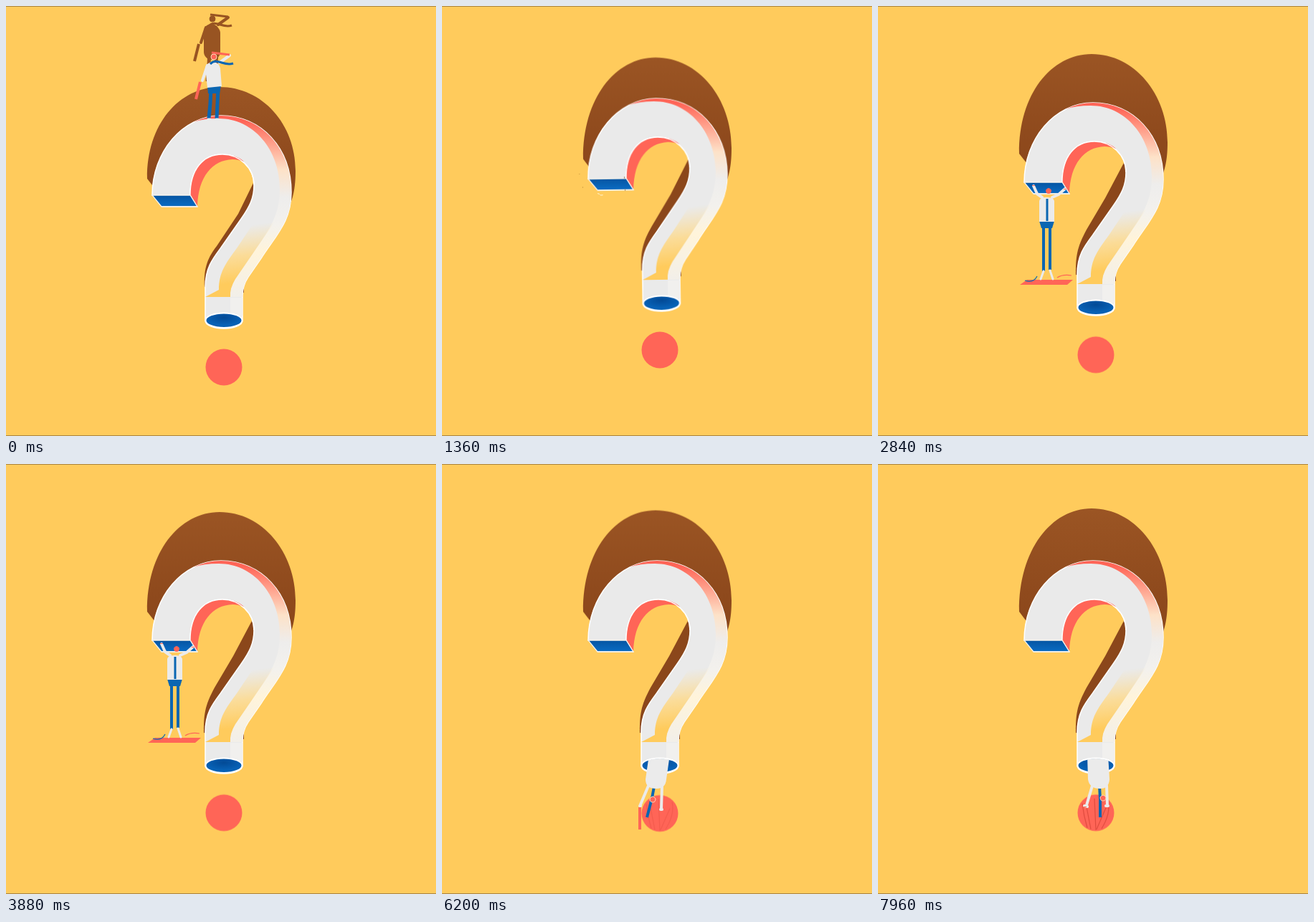
An HTML page without scripts for the animation above (8000 ms loop, 600x600 px).

```html
<!DOCTYPE html>
<html lang="en">
<head>
<meta charset="utf-8">
<title>Question mark acrobat</title>
<style>
html, body { margin: 0; width: 100%; height: 100%; overflow: hidden; background: #ffcb5c; }
svg { display: block; width: 100%; height: 100%; }

/* palette helpers */
.w { fill: #ebebeb; } .b { fill: #0a66b2; } .r { fill: #ff6557; }
.lw, .lb, .lr { fill: none; stroke-width: 4; stroke-linejoin: round; }
.lw { stroke: #ebebeb; stroke-linecap: round; }
.lb { stroke: #0a66b2; }
.lr { stroke: #ff6557; }
.thin { stroke-width: 3; }
.thick { stroke-width: 5; }
.hair { stroke-width: 1.2; }
.ring { stroke: #ffd9b8; stroke-width: 1; }

/* every moving part shares the same 8 s clock */
.mark, .shade, .strip, .dot, .showA, .showB, .showC, .showD, .jump, .cast, .poseA path,
.drop, .poseB path, .mat, .dust, .fall, .hang, .poseD path, .reach, .grip, .rim {
  animation: 8s linear infinite;
}
.mark { transform-origin: 302px 268px; animation-name: mark; animation-timing-function: ease-in-out; }
.shade { transform-origin: 300px 206px; animation-name: shade; animation-timing-function: ease-in-out; }
.strip { animation-name: strip; }
.dot { animation-name: dot; animation-timing-function: ease-in-out; }
.showA { animation-name: showA; animation-timing-function: step-end; }
.showB { animation-name: showB; animation-timing-function: step-end; }
.showC { animation-name: showC; animation-timing-function: step-end; }
.showD { animation-name: showD; animation-timing-function: step-end; }
.jump { animation-name: jump; }
.cast { animation-name: cast; }
.poseA path { animation-name: poseA; }
.drop { animation-name: drop; }
.poseB path { animation-name: poseB; animation-timing-function: ease-in-out; }
.mat { transform-origin: 235px 386px; animation-name: mat; }
.dust { transform-origin: 230px 250px; animation-name: dust; }
.fall { animation-name: fall; }
.hang { animation-name: hang; animation-timing-function: ease-out; }
.poseD path { animation-name: poseD; animation-timing-function: ease-in-out; }
.reach { transform-origin: 304px 452px; animation-name: reach; animation-timing-function: ease-in-out; }
.grip { animation-name: grip; }
.rim { animation-name: rim; }

@keyframes mark {
  0%, 3.5% { transform: none; }
  4.5% { transform: translateY(3px); }
  6%, 13% { transform: none; }
  14.3% { transform: translateY(18px) scale(1.01, .98); }
  17% { transform: translateY(-24px) rotate(-.8deg); }
  20% { transform: translateY(-15px) rotate(1.3deg) scale(1, 1.01); }
  23% { transform: translate(1px, -13px) rotate(1.3deg) scale(.985, 1.02); }
  27% { transform: translateY(-19px) rotate(-.3deg); }
  30%, 50.5% { transform: translateY(-18px); }
  52% { transform: translateY(-25px); }
  54% { transform: translateY(-16px); }
  56%, 100% { transform: translateY(-18px); }
}
@keyframes shade {
  0%, 13% { d: var(--p); transform: none; }
  14.3% { d: var(--p); transform: translateY(16px); }
  18% { d: var(--q); transform: none; }
  23% { d: var(--q); transform: translate(1px, 3px) scale(.985, .945); }
  30%, 48.5%, 50.5% { d: var(--q); transform: scale(1, .965); }
  52% { d: var(--q); transform: scale(1.02, 1.1); }
  54%, 60.5% { d: var(--q); transform: scale(1, .972); }
  77.5% { d: var(--q); transform: scale(1, .982); }
  100% { d: var(--q); transform: none; }
}
@keyframes strip { 0%, 14.3% { d: var(--p); } 18%, 100% { d: var(--q); } }
@keyframes dot {
  0%, 13% { transform: none; }
  14.3% { transform: translateY(23px); }
  17% { transform: translateY(-24px); }
  23% { transform: translate(-6px, -9.5px); }
  27% { transform: translate(1px, -19px); }
  30%, 50.5% { transform: translateY(-17.3px); }
  52% { transform: translateY(-13px); }
  54% { transform: translateY(-19px); }
  56%, 59% { transform: translateY(-17.3px); }
  60.5% { transform: translateY(-24px); }
  63.5%, 67.5% { transform: translateY(-17.3px); }
  70.5% { transform: translateY(9px); }
  73.5%, 77.5% { transform: translateY(-16.5px); }
  81% { transform: translateY(18px); }
  84%, 100% { transform: translateY(-17.3px); }
}
@keyframes showA { 0% { visibility: visible; } 13.5%, 100% { visibility: hidden; } }
@keyframes showB { 0% { visibility: hidden; } 17.5% { visibility: visible; } 52%, 100% { visibility: hidden; } }
@keyframes showC { 0% { visibility: hidden; } 57% { visibility: visible; } 63%, 100% { visibility: hidden; } }
@keyframes showD { 0% { visibility: hidden; } 65%, 100% { visibility: visible; } }
@keyframes jump {
  0%, 3.5% { transform: none; animation-timing-function: ease-out; }
  8% { transform: translate(32px, -90px); animation-timing-function: ease-in; }
  10.5% { transform: translate(49px, -26px); }
  13%, 100% { transform: translate(49px, 45px); }
}
@keyframes cast { 0%, 3.5% { transform: translate(-2px, -53px); } 10.5%, 100% { transform: translate(1px, -49px); } }
@keyframes poseA { 0%, 3.5% { d: var(--p); } 8%, 100% { d: var(--q); } }
@keyframes drop {
  0%, 17.5% { transform: translateY(-110px); animation-timing-function: ease-in; }
  21.5%, 49.5% { transform: none; animation-timing-function: ease-in; }
  52%, 100% { transform: translateY(-150px); }
}
@keyframes poseB { 0%, 24% { d: var(--p); } 31%, 100% { d: var(--q); } }
@keyframes mat {
  0%, 19.5% { transform: scaleX(0); }
  21.5%, 51.5% { transform: none; }
  54%, 100% { transform: scaleX(0); }
}
@keyframes dust {
  0%, 16.9% { opacity: 0; transform: scale(.5); }
  17% { opacity: 1; transform: scale(.5); }
  23% { opacity: .8; transform: none; }
  26%, 100% { opacity: 0; transform: scale(1.04); }
}
@keyframes fall {
  0%, 57% { transform: translateY(-75px); animation-timing-function: ease-in; }
  60.5% { transform: none; }
  63%, 100% { transform: translateY(75px); }
}
@keyframes hang { 0%, 65% { transform: translateY(-110px); } 68.5%, 100% { transform: none; } }
@keyframes poseD { 0%, 79% { d: var(--p); } 86%, 100% { d: var(--q); } }
@keyframes reach {
  0%, 67.5%, 73.5%, 77.5%, 84%, 100% { transform: none; }
  70.5% { transform: scaleY(1.45); }
  81% { transform: scaleY(1.55); }
}
@keyframes grip { 0%, 69% { opacity: 0; } 71%, 77.5% { opacity: .35; } 86%, 100% { opacity: 1; } }
@keyframes rim { 0%, 58% { opacity: 0; } 60%, 62% { opacity: 1; } 64%, 100% { opacity: 0; } }
</style>
</head>
<body>
<svg viewBox="0 0 600 600">
  <defs>
    <linearGradient id="gShade" x1="0" y1="0" x2="0" y2="1">
      <stop offset="0" stop-color="#9b5524"/><stop offset=".6" stop-color="#8f4a1d"/><stop offset="1" stop-color="#8a461a"/>
    </linearGradient>
    <linearGradient id="gSide" gradientUnits="userSpaceOnUse" x1="0" y1="153" x2="0" y2="406">
      <stop offset=".03" stop-color="#ff6557"/><stop offset=".14" stop-color="#ff9a86"/>
      <stop offset=".3" stop-color="#fde2c8"/><stop offset=".45" stop-color="#eeedec"/>
      <stop offset=".6" stop-color="#f3f1ed"/><stop offset=".75" stop-color="#fff4da"/>
      <stop offset="1" stop-color="#f2efe9"/>
    </linearGradient>
    <linearGradient id="gGlow" gradientUnits="userSpaceOnUse" x1="322" y1="308" x2="334" y2="398">
      <stop offset="0" stop-color="#ffdc90" stop-opacity="0"/><stop offset=".45" stop-color="#ffd883" stop-opacity=".8"/>
      <stop offset=".85" stop-color="#ffcb5c"/>
    </linearGradient>
    <linearGradient id="gHook" x1="0" y1="0" x2="0" y2="1">
      <stop offset="0" stop-color="#0655a2"/><stop offset="1" stop-color="#0a6cc4"/>
    </linearGradient>
    <radialGradient id="gTube" cy=".3">
      <stop offset="0" stop-color="#034a96"/><stop offset="1" stop-color="#0761b5"/>
    </radialGradient>
    <!-- the jumper together with his cast shadow -->
    <filter id="castShadow" filterUnits="userSpaceOnUse" x="0" y="-200" width="600" height="800" color-interpolation-filters="sRGB">
      <feFlood flood-color="#985422"/>
      <feComposite operator="in" in2="SourceAlpha"/>
      <feOffset dx="0" dy="-50" result="shadow">
        <animate attributeName="dx" dur="8s" repeatCount="indefinite" values="-2;-2;4;4" keyTimes="0;.035;.105;1"/>
        <animate attributeName="dy" dur="8s" repeatCount="indefinite" values="-53;-53;-44;-44" keyTimes="0;.035;.105;1"/>
      </feOffset>
      <feMerge><feMergeNode in="shadow"/><feMergeNode in="SourceGraphic"/></feMerge>
    </filter>
    <clipPath id="aboveMark"><path d="M0 0H600V158H0Z"/></clipPath>
    <clipPath id="underHook"><path d="M204 247H257L270 266V600H150V247Z"/></clipPath>
    <clipPath id="tubeToDot"><path d="M278 421A26 10.5 0 0 1 330 421V480A25.5 25.5 0 0 1 278.5 480Z"/></clipPath>
    <clipPath id="belowTube"><path d="M279 421A25 10 0 0 1 329 421V600H250V432H279Z"/></clipPath>
  </defs>

  <rect width="600" height="600" fill="#ffcb5c"/>

  <path class="shade" fill="url(#gShade)" style="
    --p:path('M197 241C196 165 242 113 298 113C358 113 404 165 404 230C404 262 398 275 390 290L372 270C372 205 340 180 300 180C255 180 232 215 230 262L204 250Z');
    --q:path('M197 206C196 120 242 62 298 62C358 62 404 120 404 190C404 218 400 232 390 255L372 250C372 190 340 163 300 163C255 163 232 195 230 240L206 218Z')"/>

  <g class="mark">
    <path class="strip" fill="#8b471b" style="
      --p:path('M346 245L324 290L294 335C279 354 276 370 277 392L332 400L332 380L360 290Z');
      --q:path('M344 235L317 286L291 330C277 356 276 368 276 393L332 402L332 380L360 280Z')"/>
    <path fill="#eaeaea" stroke="#fff" stroke-width="1.5" d="M204 264C204 204 246 153 300 153C356 153 398 198 398 260C398 300 378 318 356 352L338 378Q330 390 330 404V439A26 11 0 0 1 278 439V392C278 366 288 353 300 337L328 297C340 280 346 268 346 250C346 226 326 207 302 207C275 207 257 228 257 264Z"/>
    <path fill="url(#gSide)" d="M262 162Q280 153 300 153C356 153 398 198 398 260C398 300 378 318 356 352L338 378Q330 390 330 406H313Q312 394 320 381L344 346C368 311 382 292 382 255C382 200 345 157 297 157Q275 157 262 162Z"/>
    <path fill="url(#gGlow)" d="M278 406L297 396C297 372 306 360 322 338L346 302H374L344 346L320 381Q312 394 313 406Z"/>
    <path fill="#f1f0ee" d="M313 407H330V432H313Z"/>
    <path class="r" d="M257 264C257 228 275 207 302 207Q321 207 332 217Q323 214 316 214C288 215 268 238 267 280Z"/>
    <path fill="none" stroke="#fff" stroke-width="1.3" d="M267 280L257 264C257 228 275 207 302 207C326 207 346 226 346 250"/>
    <path fill="url(#gHook)" stroke="#f4f1ea" stroke-width="1.3" d="M204 264H257L267 280H217Z"/>
    <path stroke="#f1ede2" stroke-width="2" d="M217 280H267"/>
    <ellipse cx="304" cy="438.7" rx="25.5" ry="10.3" fill="url(#gTube)" stroke="#fff" stroke-width="2"/>
  </g>

  <g class="dot">
    <circle class="r" cx="304" cy="504" r="25.5"/>
    <circle class="rim" cx="304" cy="504" r="25" fill="none" stroke="#ffe2b8"/>
    <path class="grip" fill="none" stroke="#df4c3f" stroke-width="1.2" d="M291 496L297 527M302 484L304 528M318 497L305 527M285 491Q287 508 292 525M321 488Q325 505 312 526"/>
  </g>

  <g class="showA" clip-path="url(#aboveMark)">
    <g class="cast"><rect class="jump" x="278" y="80" width="23" height="48" rx="11" fill="#985422"/></g>
    <g filter="url(#castShadow)"><g class="jump poseA">
      <path class="lb thick" style="--p:path('M286 115L285 136L283 157');--q:path('M283 123L305 110L322 143')"/>
      <path class="lb thick" style="--p:path('M296 115L295 136L294 157');--q:path('M291 124L319 123L328 157')"/>
      <path class="lw thin" style="--p:path('M282 158L285 158');--q:path('M320 143L327 142')"/>
      <path class="lw thin" style="--p:path('M293 158L296 158');--q:path('M328 157L336 155')"/>
      <path class="b" style="--p:path('M281 111L300 111L298 122L282 122Z');--q:path('M278 118L298 118L296 127L279 127Z')"/>
      <path class="lw" style="--p:path('M281 83L274 104');--q:path('M281 86L269 71')"/>
      <path class="lr" style="--p:path('M271 106L265 130');--q:path('M270 71L280 53')"/>
      <path class="w" style="--p:path('M278 86Q281 78 289 78Q298 79 299 87L301 112L281 114Z');--q:path('M278 87Q281 78 289 78Q298 79 301 88L298 119L278 120Z')"/>
      <path class="lw" style="--p:path('M298 79L312 69');--q:path('M299 86L312 74')"/>
      <path class="lr thin" style="--p:path('M312 68L287 65');--q:path('M312 73L312 51')"/>
      <circle class="r ring" cx="290" cy="71" r="4"/>
      <path class="lb thin" style="--p:path('M285 81C294 71 304 85 317 80');--q:path('M288 88C300 89 310 82 316 72')"/>
    </g></g>
  </g>

  <g class="dust" fill="none" stroke="#8a5a22" stroke-width="1.3">
    <path d="M153 219h1.5M163 255v2M198 240h2M279 226v6M281 261v5"/>
    <path stroke="#fff0c8" stroke-width="2" d="M204 273l6 2M211 277q4 2 8 0"/>
  </g>

  <g class="mat"><g class="poseB">
    <path class="r" style="--p:path('M207 391L217 380L263 380L255 391Z');--q:path('M198 389L208 382L272 382L264 389Z')"/>
  </g></g>
  <g class="showB" clip-path="url(#underHook)"><g class="drop poseB">
    <path class="lb" style="--p:path('M231 337L211 354L233 382');--q:path('M231 306L231 338L231 370')"/>
    <path class="lb" style="--p:path('M240 337L261 353L240 382');--q:path('M240 306L240 338L240 368')"/>
    <path class="lw thin" style="--p:path('M232 384L221 384');--q:path('M231 370L227 381')"/>
    <path class="lw thin" style="--p:path('M239 384L250 384');--q:path('M240 369L244 381')"/>
    <path class="lb hair" style="--p:path('M228 385Q226 385 224 385');--q:path('M205 383Q217 387 222 377')"/>
    <path class="lr hair" style="--p:path('M243 385Q245 385 247 385');--q:path('M250 379Q258 374 270 376')"/>
    <path class="b" style="--p:path('M225 331L246 331L242 340L229 340Z');--q:path('M225 300L246 300L243 310L228 310Z')"/>
    <path class="lw" style="--p:path('M224 304L218 313L214 322');--q:path('M229 267L222 262L217 251')"/>
    <path class="lw" style="--p:path('M243 304L249 312L253 321');--q:path('M243 267L252 263L261 255')"/>
    <path class="lr" style="--p:path('M213 322L214 344');--q:path('M217 250L217 251')"/>
    <path class="lr" style="--p:path('M253 322L251 344');--q:path('M261 255L261 256')"/>
    <path class="w" style="--p:path('M224 304Q230 294 235 294Q242 296 245 306L247 332L223 333Z');--q:path('M225 272Q226 267 235 267Q245 267 246 272L246 301L225 301Z')"/>
    <path class="lb thin" style="--p:path('M235 300L223 329');--q:path('M236 269L236 300')"/>
    <path class="r" style="--p:path('M220 293Q225 286 229 292Q229 299 223 301Q218 300 220 293Z');--q:path('M234 257Q238 251 242 257Q242 262 238 262Q234 262 234 257Z')"/>
  </g></g>

  <g class="showC" clip-path="url(#tubeToDot)"><g class="fall">
    <path class="lw thick" d="M295 466L284 489M314 466L324 489"/>
    <path class="w" d="M289 512V478Q291 457 304 457Q317 457 318 478V512Z"/>
    <path class="lb" d="M304 459C308 448 328 450 321 428"/>
    <circle class="r ring" cx="303" cy="440" r="4.5"/>
  </g></g>

  <g class="showD" clip-path="url(#belowTube)"><g class="hang poseD">
    <g class="reach">
      <path class="lw" style="--p:path('M288 449L277 475');--q:path('M299 449L291 476')"/>
      <path class="lw" style="--p:path('M307 449L306 481');--q:path('M319 449L320 476')"/>
      <path class="lw" style="--p:path('M276 477L277 477');--q:path('M288 477L292 478')"/>
      <path class="lw" style="--p:path('M305 482L307 482');--q:path('M318 477L321 477')"/>
      <path class="lr" style="--p:path('M276 479L276 510');--q:path('M289 478L289 479')"/>
    </g>
    <path class="lb" style="--p:path('M296 450L293 466L286 493');--q:path('M309 448L310 468L310 493')"/>
    <path class="r ring" style="--p:path('M290 467Q294 461 298 467Q298 472 294 472Q290 472 290 467Z');--q:path('M310 465Q314 459 318 465Q318 470 314 470Q310 470 310 465Z')"/>
    <path class="w" style="--p:path('M289 405L318 405L313 440Q312 453 299 453Q284 453 284 440Z');--q:path('M292 405L321 405L323 440Q322 453 310 453Q295 453 293 440Z')"/>
  </g></g>

  <path stroke="#a98445" stroke-width="1" d="M0 .5H600M0 599.5H600"/>
</svg>
</body>
</html>
```
